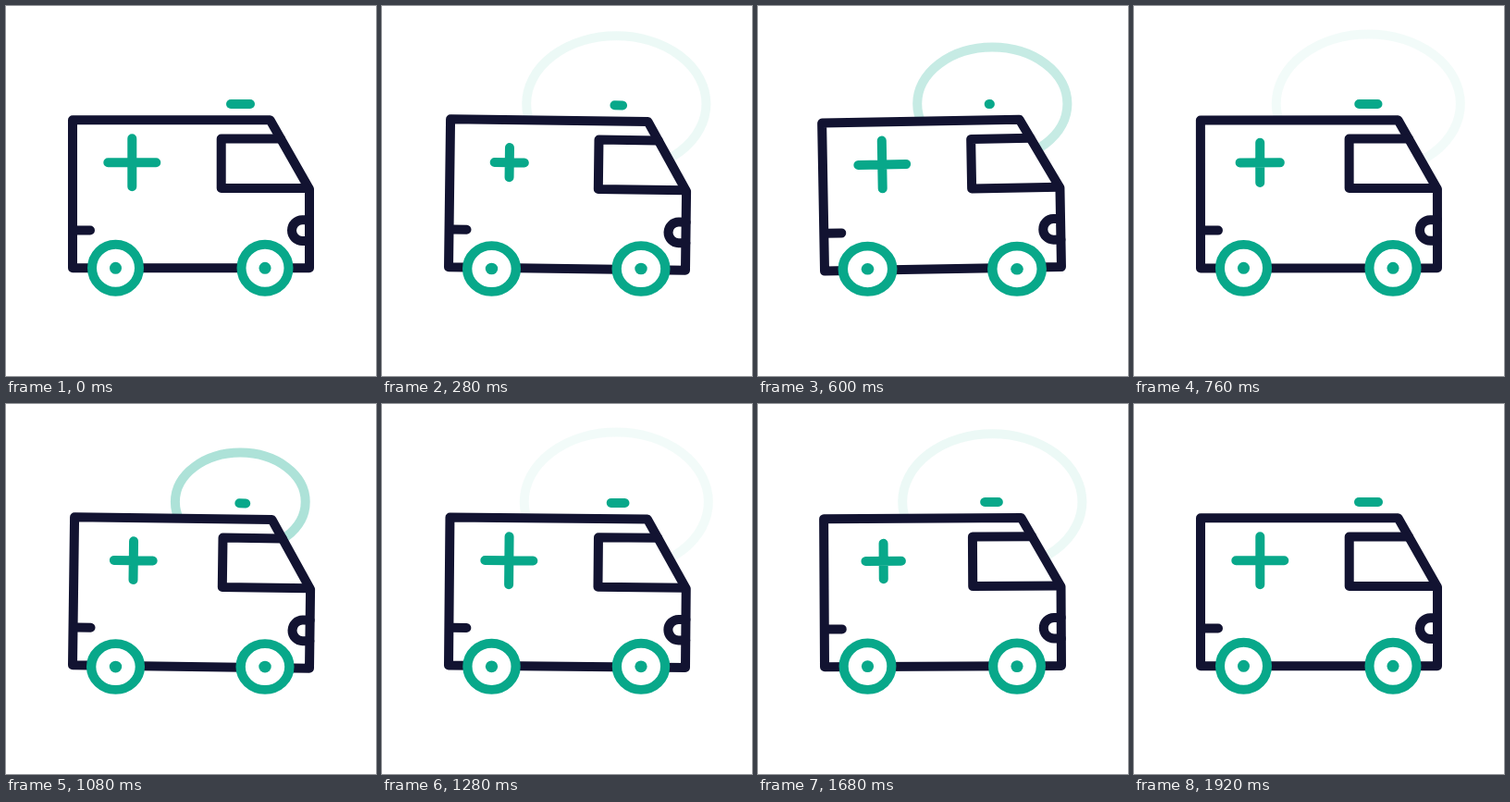
These frames come from a looping animation (400x400 px, 1960 ms). An HTML page:

```html
<!DOCTYPE html>
<html lang="en">
<head>
<meta charset="utf-8">
<title>Ambulance</title>
<style>
  html, body { margin: 0; width: 100%; height: 100%; overflow: hidden; background: #fff; }
  svg { display: block; width: 100%; height: 100%; }
  .line { stroke-width: 10; stroke-linecap: round; stroke-linejoin: round; fill: none; }
  .dark { stroke: #121331; }
  .teal { stroke: #08a88a; }
  .solid { fill: #fff; }
  .hub { fill: #08a88a; }
</style>
</head>
<body>
<svg viewBox="0 0 400 400">
  <ellipse id="ring" class="line teal" cx="253.3" cy="105.7"/>
  <g id="van">
    <path class="line dark solid" d="M72 123.3H285.5L328 198V283.3H72Z"/>
    <path class="line dark" d="M297 143.5H232.7V197H327M74 242.5H91M328 231.3H320.3a11.3 11.3 0 0 0 0 22.6H328"/>
    <path id="cross" class="line teal"/>
    <path id="siren" class="line teal"/>
  </g>
  <g class="wheel">
    <circle class="line teal solid" cx="118.5" cy="283.3" r="25.5"/>
    <circle class="hub" cx="118.5" cy="283.3" r="6.5"/>
  </g>
  <g class="wheel">
    <circle class="line teal solid" cx="280" cy="283.3" r="25.5"/>
    <circle class="hub" cx="280" cy="283.3" r="6.5"/>
  </g>
</svg>
<script>
const STEP = 40, LOOP = 1960;
const CYCLE = 24, SECOND_PULSE = 11, CROSS_CYCLE = 16;
const $ = id => document.getElementById(id);
const wheels = document.querySelectorAll('.wheel');
const WHEEL_X = [118.5, 280];

const sine = p => (1 - Math.cos(Math.PI * p)) / 2;
const soft = p => (p + sine(p)) / 2;

// Value at x along [position, value, easing into this key] keys.
function track(keys, x) {
  for (let i = 1; i < keys.length; i++) {
    const [x0, v0] = keys[i - 1], [x1, v1, ease = sine] = keys[i];
    if (x <= x1) return v0 + (v1 - v0) * ease((x - x0) / (x1 - x0));
  }
  return keys[keys.length - 1][1];
}

const TILT = [[0, 0], [4.8, 1.07], [15.4, -1.08, soft], [19.5, 0]];
const SIREN = [[0, 10.5], [4.8, 0.3], [9.9, 10.5], [10.9, 10.5], [15.5, 0.3], [19.5, 10.5]];
const CROSS = [[0, 26], [6.5, 16], [15.6, 26]];

function drawRing(phase) {
  const age = phase < SECOND_PULSE ? phase : phase - SECOND_PULSE;
  const fade = Math.exp(-0.37 * age);
  const rx = 105 * (1 - fade);
  const ring = $('ring');
  ring.setAttribute('rx', rx);
  ring.setAttribute('ry', rx * 0.755);
  ring.setAttribute('opacity', age > 0 && age < 11 ? fade : 0);
}

function draw(time) {
  const step = Math.floor((time % LOOP) / STEP);
  const phase = step % CYCLE;
  const tilt = track(TILT, phase);
  const squash = Math.abs(tilt) / 1.08;
  const arm = track(CROSS, step % CROSS_CYCLE);
  const half = track(SIREN, phase);

  drawRing(phase);
  $('van').setAttribute('transform', `translate(0 ${squash}) rotate(${tilt} 200 283.3)`);
  $('cross').setAttribute('d', `M${136.3 - arm} 169.3h${2 * arm}M136.3 ${169.3 - arm}v${2 * arm}`);
  $('siren').setAttribute('d', `M${253.5 - half} 106h${2 * half}`);
  wheels.forEach((wheel, i) => {
    const sx = 1 + 0.05 * squash, sy = 1 - 0.035 * squash;
    wheel.setAttribute('transform',
      `translate(${WHEEL_X[i]} 313.8) scale(${sx} ${sy}) translate(${-WHEEL_X[i]} -313.8)`);
  });
}

const start = performance.now();
function tick() {
  draw(performance.now() - start);
  requestAnimationFrame(tick);
}
draw(0);
requestAnimationFrame(tick);
</script>
</body>
</html>
```
